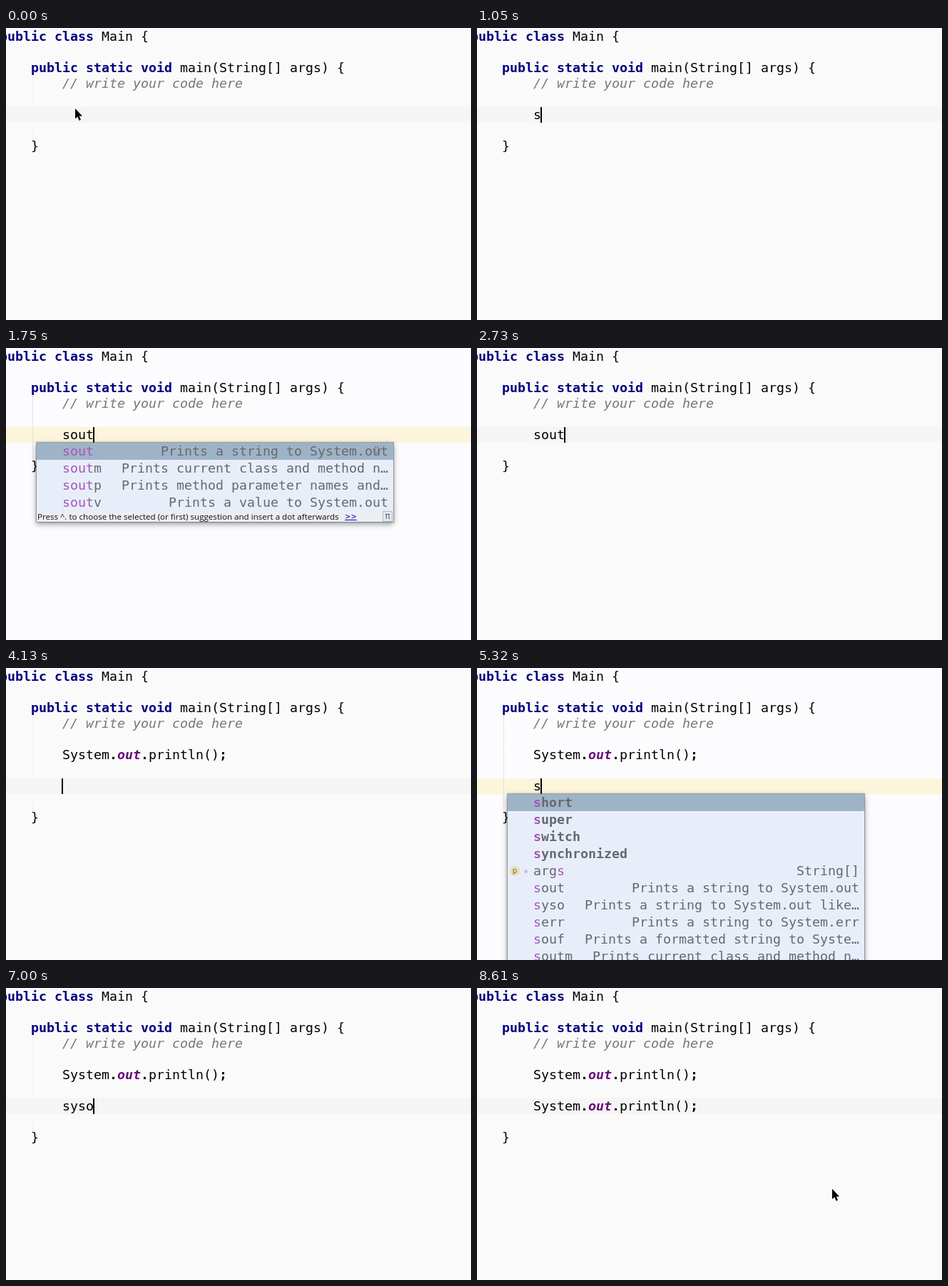
These frames come from a looping animation (652 px wide and 410 px high, 8.68 s). An HTML page:

```html
<!DOCTYPE html>
<html lang="en">
<head>
<meta charset="utf-8">
<title>Code completion</title>
<style>
html, body { margin: 0; width: 100%; height: 100%; overflow: hidden; }
#stage {
  position: relative; width: 652px; height: 410px; overflow: hidden;
  background: #fafafa; color: #000;
  font: 18.27px/22px "DejaVu Sans Mono", monospace; white-space: pre;
}
#stage.lit { background: #fcfcfe; }
#stage div, #stage span, #stage svg { position: absolute; }
#row { left: 0; width: 652px; height: 22px; background: #f5f5f5; box-shadow: 0 0 0 1px #fbf9ef; }
.lit #row { background: #fcf5dc; box-shadow: none; }
#guide { left: 37px; top: 67px; width: 0; border-left: 1px dotted #f6f1e2; }
.lit #guide { border-color: #ccc; }
#code { left: -9px; top: 1px; }
#code b { color: #000080; }
#code i { color: #777; }
#code em { color: #660e7a; font-weight: bold; }
#code s { text-decoration: none; font-weight: bold; }
#caret { width: 2px; height: 22px; background: #000; }
#popup {
  left: 43px; width: 500px; overflow: hidden; background: #e8eef9; color: #68686c; line-height: 24px;
}
#frame { left: 43px; width: 500px; box-shadow: 0 0 1px 1px rgba(90,100,110,.5), 0 3px 8px rgba(0,0,0,.42); }
.item { left: 0; width: 500px; height: 24px; }
.item:first-child { background: #9fb3c7; }
.item .name { left: 36px; }
.item .info { right: 7px; }
.item u { text-decoration: none; color: #a557b8; }
.param {
  left: 3px; top: 5px; width: 14px; height: 14px; border-radius: 7px; background: #eadfb4;
  font: 10px/13px "DejaVu Sans", sans-serif; text-align: center; color: #665;
}
.dot { left: 23px; top: 10px; width: 5px; height: 5px; border-radius: 3px; background: #c3c6cd; }
#tip {
  left: 0; bottom: 0; width: 500px; height: 15px; background: #eceef2; color: #111;
  font: 11.6px/15px "Open Sans", sans-serif;
}
#tip span { left: 1px; }
#tip .more { left: 432px; font: 10px/15px "DejaVu Sans", sans-serif; color: #00c; text-decoration: underline; }
#tip .pi {
  left: 485px; top: 0; width: 12px; height: 13px; border: 1px solid #b4bac4; background: #e3e8f0;
  font: 12px/12px "DejaVu Sans", sans-serif; text-align: center; color: #567;
}
#spin { left: 513px; top: 136px; }
#mouse { left: 0; top: 0; overflow: visible; }
</style>
</head>
<body>
<div id="stage">
  <div id="row"></div>
  <div id="guide"></div>
  <div id="code"></div>
  <div id="caret"></div>
  <div id="frame"></div>
  <div id="popup"></div>
  <svg id="spin" width="14" height="14"><circle cx="7" cy="7" r="4" fill="none" stroke="#555" stroke-opacity=".6" stroke-width="3" stroke-dasharray="1.2 1.94"/></svg>
  <svg id="mouse" width="12" height="20"><path d="M0 0V14.5L3.3 11.5 5.6 17 8 16 5.7 10.8H10.2Z" stroke="#fff" stroke-width="1.6" paint-order="stroke"/></svg>
</div>
<script>
const LOOP = 8680, ROW = 22, COL = 11, LEFT = 79;
const $ = id => document.getElementById(id);
const print = 'System<s>.</s><em>out</em><s>.</s>println()<s>;</s>';
const toOut = 'Prints a string to System.out';

// name, description, kind
const all = [
  ['short', '', 'key'], ['super', '', 'key'], ['switch', '', 'key'], ['synchronized', '', 'key'],
  ['args', 'String[]', 'param'],
  ['sout', toOut], ['syso', toOut + ' like…'], ['serr', 'Prints a string to System.err'],
  ['souf', 'Prints a formatted string to Syste…'],
  ['soutm', 'Prints current class and method n…'],
  ['soutp', 'Prints method parameter names and…']
];
const soutItems = [all[5], all[9], all[10], ['soutv', 'Prints a value to System.out']];
const popups = {
  all: { items: all, match: 's', height: 267, tip: true },
  sout: { items: soutItems, match: 'sout', height: 111, tip: true },
  shrink: { items: all.slice(0, 3), match: 's', height: 63 },
  syso: { items: [all[6]], match: 'syso', height: 39, tip: true }
};

// Each step overrides part of the state from its time on.
const steps = [
  [0, { first: '', second: '', enters: 0, line: 5, col: 0, caret: false, popup: '', spin: false }],
  [70, { caret: true }],
  [560, { caret: false }],
  [700, { first: 's', col: 1, caret: true }],
  [1190, { popup: 'all' }],
  [1400, { first: 'so', col: 2 }],
  [1540, { first: 'sou', col: 3 }],
  [1680, { first: 'sout', col: 4 }],
  [1750, { popup: 'sout', spin: true }],
  [1890, { spin: false }],
  [2730, { popup: '' }],
  [2800, { first: print, col: 19 }],
  [3290, { col: 21 }],
  [3640, { caret: false }],
  [3920, { enters: 1, line: 6, col: 0, caret: true }],
  [4060, { enters: 2, line: 7 }],
  [4830, { caret: false }],
  [5040, { second: 's', col: 1, caret: true }],
  [5250, { popup: 'all' }],
  [5460, { second: 'sy', col: 2 }],
  [5600, { popup: 'shrink' }],
  [5670, { second: 'sys', col: 3 }],
  [5810, { second: 'syso', col: 4 }],
  [5880, { popup: 'syso' }],
  [7000, { popup: '' }],
  [7070, { second: print, col: 19 }],
  [7560, { caret: false }],
  [7980, { col: 21, caret: true }],
  [8470, { caret: false }]
];

const itemHtml = ([name, info, kind], i, match) => {
  const at = name.indexOf(match);
  const label = name.slice(0, at) + `<u>${match}</u>` + name.slice(at + match.length);
  const icon = kind === 'param' ? '<span class="param">p</span><span class="dot"></span>' : '';
  const bold = kind === 'key' ? ' style="font-weight:bold"' : '';
  return `<div class="item" style="top:${i * 24}px">${icon}<span class="name"${bold}>${label}</span><span class="info">${info}</span></div>`;
};

const tipHtml = '<div id="tip"><span>Press ^. to choose the selected (or first) suggestion and insert a dot afterwards</span>' +
  '<span class="more">&gt;&gt;</span><span class="pi">π</span></div>';

function codeHtml(s) {
  const pad = '        ';
  const lines = [
    '<b>public class</b> Main {', '',
    '    <b>public static void</b> main(String[] args) {',
    pad + '<i>// write your code here</i>', '',
    pad + s.first
  ];
  for (let i = 1; i <= s.enters; i++) lines.push(i === 2 ? pad + s.second : '');
  return lines.concat('', '    }', '}').join('\n');
}

function draw(s) {
  const top = 1 + s.line * ROW, p = popups[s.popup];
  $('stage').className = p ? 'lit' : '';
  $('row').style.top = top + 'px';
  $('guide').style.height = 88 + s.enters * ROW + 'px';
  $('code').innerHTML = codeHtml(s);
  $('caret').style.cssText = `left:${LEFT - 1 + s.col * COL}px;top:${top}px;opacity:${+s.caret}`;
  $('spin').style.opacity = +s.spin;
  for (const id of ['frame', 'popup']) {
    const box = $(id).style;
    box.display = p ? 'block' : 'none';
    box.top = top + ROW + 'px';
    box.height = (p ? p.height : 0) + 'px';
  }
  $('popup').innerHTML = p
    ? p.items.map((item, i) => itemHtml(item, i, p.match)).join('') + (p.tip ? tipHtml : '') : '';
}

function moveMouse(t) {
  const k = Math.min(1, Math.max(0, (t - 7980) / 560));
  const ease = 1 - (1 - k) ** 3;
  const [x, y] = t < 700 ? [97, 113] : [628 - 130 * ease, 205 + 77 * ease];
  $('mouse').style.transform = `translate(${x}px,${y}px)`;
  $('mouse').style.opacity = t < 700 || t >= 7980 ? 1 : 0;
}

let shown = -1;
const start = performance.now();
function tick() {
  const t = (performance.now() - start) % LOOP;
  const now = steps.filter(([at]) => at <= t);
  if (now.length !== shown) {
    shown = now.length;
    draw(Object.assign({}, ...now.map(step => step[1])));
  }
  moveMouse(t);
  requestAnimationFrame(tick);
}
tick();
</script>
</body>
</html>
```
